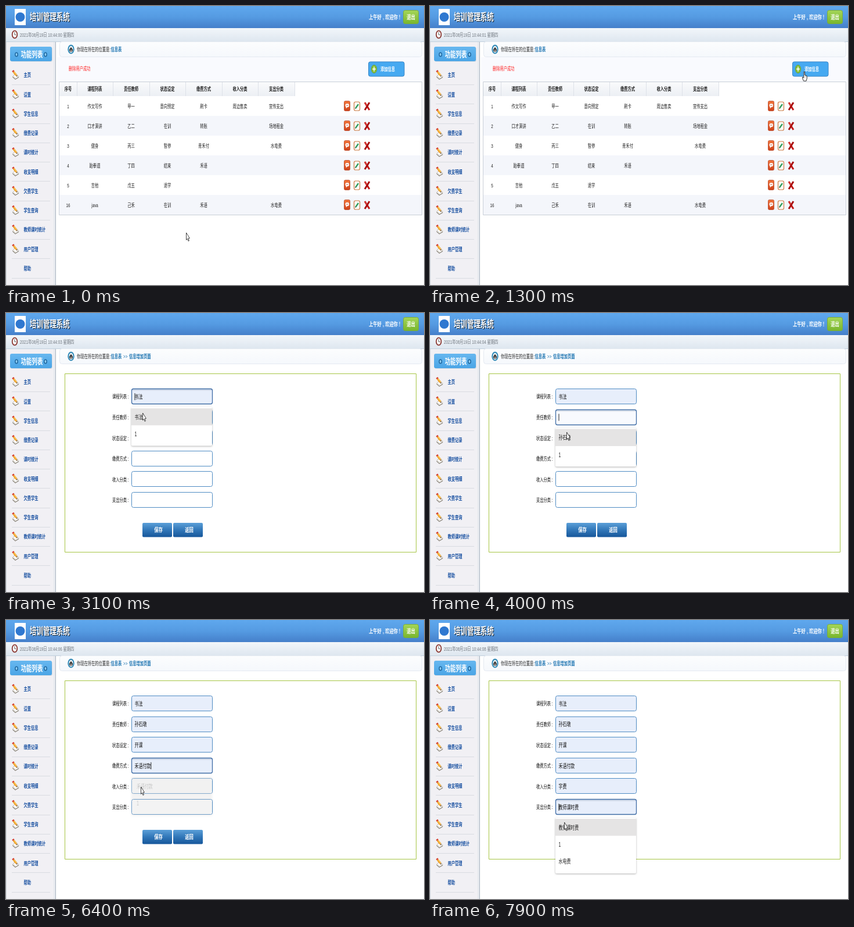
An HTML page with a canvas for the animation above (8000 ms loop, 720 px wide and 480 px high).

```html
<!DOCTYPE html>
<html lang="zh-CN">
<head>
<meta charset="utf-8">
<style>
html, body { margin: 0; width: 720px; height: 480px; overflow: hidden; background: #fff; }
canvas { display: block; }
</style>
</head>
<body>
<canvas id="stage" width="720" height="480"></canvas>
<script>
const ctx = document.getElementById('stage').getContext('2d');
const LOOP = 8000, STEP = 100;
// The whole screen is squeezed, so type and round icons share one scale.
const SX = .521, SY = .765;
const FONT = '"Liberation Sans", "Noto Sans CJK SC", "Noto Sans CJK", sans-serif';

const menu = ['主页', '设置', '学生信息', '缴费记录', '课时统计', '收支明细', '欠费学生', '学生查询', '教师课时统计', '用户管理', '帮助'];
const edges = [92, 122, 184, 247, 309, 372, 434, 497];
const heads = ['序号', '课程列表', '责任教师', '状态设定', '缴费方式', '收入分类', '支出分类'];
const rows = [
  ['1', '作文写作', '甲一', '意向预定', '刷卡', '周边售卖', '宣传支出'],
  ['2', '口才演讲', '乙二', '在训', '转账', '', '场地租金'],
  ['3', '健身', '丙三', '暂停', '青禾付', '', '水电费'],
  ['4', '跆拳道', '丁四', '结束', '禾语', '', ''],
  ['5', '吉他', '戊五', '退学', '', '', ''],
  ['16', 'java', '己禾', '在训', '禾语', '', '水电费']
];
const fields = [
  { label: '课程列表', options: ['书法', '1'], open: 2600, pick: 3200 },
  { label: '责任教师', options: ['孙石墩', '1'], open: 3600, pick: 4300 },
  { label: '状态设定', options: ['开课', '1'], open: 4600, pick: 5100 },
  { label: '缴费方式', options: ['禾语付款', '1'], open: 5700, pick: 6400 },
  { label: '收入分类', options: ['字费', '1'], open: 6700, pick: 7100 },
  { label: '支出分类', options: ['教师课时费', '1', '水电费'], open: 7400, pick: 8100 }
];
const FORM_AT = 1500;
const ARROW = 0, HAND = 1, BEAM = 2;
// time, x, y, pointer shape
const path = [
  [0, 310, 390, ARROW], [150, 310, 390, ARROW], [800, 662, 193, ARROW],
  [1200, 645, 113, HAND], [2000, 645, 113, HAND], [2050, 645, 113, ARROW],
  [2500, 236, 146, BEAM], [2700, 236, 146, ARROW], [3000, 235, 172, ARROW],
  [3250, 235, 172, BEAM], [3500, 235, 182, BEAM], [3700, 235, 184, ARROW],
  [3950, 235, 205, ARROW], [4300, 235, 205, BEAM], [4550, 231, 218, BEAM],
  [4700, 231, 222, ARROW], [4900, 231, 243, ARROW], [5150, 231, 244, BEAM],
  [5450, 226, 256, BEAM], [5700, 226, 256, ARROW], [6000, 232, 287, ARROW],
  [6500, 232, 287, BEAM], [6750, 232, 293, ARROW], [6950, 232, 318, ARROW],
  [7150, 232, 320, BEAM], [7400, 232, 326, ARROW], [7750, 231, 348, ARROW], [8000, 231, 348, ARROW]
];

function pointer(t) {
  t = Math.max(0, t);
  const i = Math.max(0, path.findIndex(p => p[0] > t) - 1);
  const a = path[i], b = path[i + 1], k = (t - a[0]) / (b[0] - a[0]);
  return { x: a[1] + (b[1] - a[1]) * k, y: a[2] + (b[2] - a[2]) * k, shape: a[3] };
}

function text(s, x, y, color, size = 12, bold = false, align = 'left') {
  ctx.save();
  ctx.translate(x, y + size * .37 * SY);
  ctx.scale(SX, SY);
  ctx.font = (bold ? 'bold ' : '') + size + 'px ' + FONT;
  ctx.textAlign = align;
  ctx.fillStyle = color;
  ctx.fillText(s, 0, 0);
  const width = ctx.measureText(s).width * SX;
  ctx.restore();
  return width;
}

function fade(y, h, ...colors) {
  const g = ctx.createLinearGradient(0, y, 0, y + h);
  colors.forEach((c, i) => g.addColorStop(i / (colors.length - 1), c));
  return g;
}

function paint(fill, stroke, line) {
  if (fill) { ctx.fillStyle = fill; ctx.fill(); }
  if (stroke) { ctx.strokeStyle = stroke; ctx.lineWidth = line; ctx.stroke(); }
}

function box(x, y, w, h, fill, r = 0, stroke, line = 1) {
  ctx.beginPath();
  ctx.roundRect(x, y, w, h, r);
  paint(fill, stroke, line);
}

function round(x, y, r, fill, stroke, line = 1) {
  ctx.beginPath();
  ctx.ellipse(x, y, r * SX / SY, r, 0, 0, 7);
  paint(fill, stroke, line);
}

function lines(points, color, width = 1, fill) {
  ctx.beginPath();
  points.forEach(p => ctx.lineTo(p[0], p[1]));
  if (fill) ctx.closePath();
  paint(fill, color, width);
}

function at(x, y, draw) {
  ctx.save();
  ctx.translate(x, y);
  draw();
  ctx.restore();
}

function menuIcon() {
  lines([[-4.5, 3], [1, -2], [6, 3.5], [0, 8]], '#a9a294', .8, '#fff');
  lines([[-4.5, 4], [0, 8], [6, 4.5]], '#8f8a80', 1.2);
  lines([[-2.5, 3.5], [1, 6]], '#c9c4b8', .8);
  lines([[-3, -5], [2, 1.5]], '#f0a32a', 3.6);
  lines([[-2, -5], [2.6, 1]], '#fbd880', 1);
  lines([[-4.3, -6.8], [-2.9, -5]], '#d43a2c', 3.6);
  lines([[2, 1.5], [3.3, 3.2]], '#6b4a28', 1.6);
}

function header(t) {
  box(0, 0, 720, 38, fade(0, 38, '#5fa8ee', '#559be2', '#457fca'));
  box(15, 5, 19, 28, '#fff');
  box(16.5, 11, 16, 16, '#2f78d0', 8);
  text('培训管理系统', 42, 20, '#123', 22, true);
  text('培训管理系统', 41, 19, '#fff', 22, true);
  text('上午好 , 欢迎你 !', 625, 19, '#fff', 14, true);
  box(684.5, 7.5, 26, 23, fade(7, 24, '#a5d65a', '#78b52c'), 3, '#79ad3a');
  text('退出', 697.5, 19, '#fff', 14, true, 'center');
  box(0, 38, 720, 24, fade(38, 24, '#f2f6fa', '#dde6ef'));
  box(0, 61, 720, 1, '#c3d1de');
  round(15, 49, 6.3, '#fff', '#8c3b35', 1.8);
  lines([[15, 45], [15, 49.5], [17.2, 49.5]], '#444', .9);
  const sec = Math.floor((t + 350) / 1000);
  text(`2021年08月19日 10:44:0${sec} 星期四`, 24, 50, '#70777f');
}

function sidebar() {
  box(0, 62, 85, 418, '#f1f0f4');
  box(0, 62, 1, 418, '#d5dae2');
  box(82, 62, 3, 418, '#e6e9ee');
  box(85, 62, 1, 418, '#a9b4c0');
  box(8, 71, 72, 25, '#d3dae2', 3);
  box(7, 70, 72, 25, fade(70, 25, '#67b7ef', '#4ba5e6'), 3);
  round(18, 83.5, 3.2, '#8fd0f8', '#1f679f', 1.5);
  round(68, 83.5, 3.2, '#8fd0f8', '#1f679f', 1.5);
  text('功能列表', 44.5, 83, '#fff', 18, true, 'center');
  menu.forEach((name, i) => {
    const y = 119 + i * 33.25;
    if (i < 10) at(16, y - 1, menuIcon);
    text(name, 30.5, y, '#174fa0', 12, true);
    box(10, Math.round(y + 16), 66, 1, '#d9dbe1');
  });
}

function breadcrumb(form) {
  box(92.5, 61.5, 624, 26, fade(62, 26, '#fcfdfe', '#f5f8fc'), 4, '#e4e9f1');
  round(112, 74.5, 6.8, '#fff', '#3a8fba', 2.2);
  lines([[109.2, 75], [112, 70.8], [114.8, 75], [114, 78.3], [110, 78.3]], '#333', .4, '#333');
  box(111.4, 75, 1.4, 3, '#e8d0c8');
  text('你现在所在的位置是:', 122, 75, '#222');
  const link = '#1a72b0';
  text('信息表', 180.5, 75, link, 12, true);
  if (form) {
    text('>>', 202, 75, link);
    text('信息增加页面', 212, 75, link, 12, true);
  }
}

function actions(y) {
  box(582.5, y - 8.5, 10, 17, fade(y - 8, 16, '#f2743a', '#cf421a'), 2, '#b8482a', .8);
  box(584.5, y - 4, 6.5, 6, '#fff', 2.5);
  lines([[586, y + 1], [586, y + 4], [588.5, y + 1]], '#fff', .5, '#fff');
  lines([[585.8, y - 1], [589.8, y - 1]], '#d0603c', 1);
  box(599.5, y - 7, 10, 15, '#fdfdf8', 2.5, '#cb7a45', 1.2);
  lines([[602, y + 4], [607, y - 3]], '#2f9e60', 2.4);
  lines([[601.4, y + 5], [602.6, y + 3.2]], '#444', 1);
  lines([[618, y - 6], [626, y + 7]], '#c31818', 3);
  lines([[626, y - 6], [618, y + 7]], '#a80f0f', 3);
  lines([[618.3, y - 5.5], [621.5, y - .5]], '#e85a50', 1);
}

function listPage(t) {
  box(88, 88, 632, 42, '#f9fafe');
  text('删除用户成功', 108, 108, '#f22');
  box(624.5, 96, 61.5, 25, '#46a9f1', 3, '#3b86c6');
  round(634, 108.5, 7, '#86bd3a', '#659a2c', .7);
  lines([[631.3, 108.5], [636.7, 108.5]], '#fff', 1.8);
  lines([[634, 104.5], [634, 112.5]], '#fff', 1.4);
  text('添加信息', 645, 109, '#fff', 12, true);

  const hover = Math.floor((pointer(t - 130).y - 155) / 34);
  box(92, 130, 405, 25, fade(130, 25, '#fafbfc', '#eceff4'));
  heads.forEach((h, i) => {
    text(h, (edges[i] + edges[i + 1]) / 2, 143, '#222', 12, true, 'center');
    box(edges[i + 1], 131, 1, 24, '#dde1e8');
  });
  rows.forEach((row, i) => {
    const top = 155 + i * 34;
    box(92, top, 625, 34, i === hover ? '#e5f5c9' : i % 2 ? '#f4f6fb' : '#fff');
    row.forEach((s, c) => text(s, (edges[c] + edges[c + 1]) / 2, top + 18, '#222', 12, false, 'center'));
    actions(top + 17);
  });
  box(91.5, 130.5, 625, 229, null, 0, '#c8ced6');
}

function popup(f, top, t, mouse) {
  const start = top + 33, h = 29.3, n = f.options.length;
  const closing = t >= f.pick;
  ctx.save();
  if (closing) ctx.globalAlpha = .2;
  ctx.shadowColor = 'rgba(0,0,0,.3)';
  ctx.shadowBlur = 3;
  ctx.shadowOffsetY = 1;
  box(216, start - 2, 139, n * h + 8, '#fff', 2);
  ctx.shadowColor = 'transparent';
  const hover = Math.floor((mouse.y - start) / h);
  f.options.forEach((s, i) => {
    const y = start + i * h;
    if (i === hover) box(216, y, 139, h, '#e5e4e4');
    text(s, closing ? 225 : 221.5, y + 15, '#222', 13.33);
  });
  ctx.restore();
}

function formPage(t, mouse) {
  box(101.5, 104.5, 605, 307, null, 0, '#a6c544');
  const focus = fields.findLastIndex(f => t >= f.open);
  const topOf = i => 131 + i * 35.6;
  fields.forEach((f, i) => {
    const top = topOf(i), y = top + 13, edge = Math.round(top) - .5;
    const preview = t >= f.pick - 200, active = i === focus;
    text(f.label + ' :', 183, y, '#111');
    const fill = preview ? '#e7eefb' : active ? '#f8fafe' : '#fff';
    box(216.5, edge, 139, 26, fill, 3, active ? '#3f6ca5' : '#4e8bc3', active ? 1.3 : 1);
    if (active) box(218, edge + 1, 136, 2, 'rgba(60,80,120,.16)');
    const w = preview ? text(f.options[0], 221.5, y, '#111', 13.33) : 0;
    if (active) box(221.5 + (t >= f.pick ? w : 0), y - 6, 1, 12, '#222');
  });
  [['保存', 235], ['返回', 288]].forEach(([s, x]) => {
    box(x, 361, 51, 24.5, fade(361, 24, '#5b9fd8', '#3278b9', '#17589c'), 2);
    text(s, x + 27.5, 373.5, '#fff', 14, true, 'center');
  });
  fields.forEach((f, i) => {
    if (t >= f.open + 100 && t < f.pick + 100) popup(f, topOf(i), t, mouse);
  });
}

function drawPointer({ x, y, shape }) {
  at(x, y, () => {
    if (shape === ARROW) {
      lines([[.5, 0], [.5, 12.5], [2.5, 10.3], [4, 14.5], [5.4, 13.8], [4, 9.8], [6.4, 9.5]], '#333', .9, '#fff');
    } else if (shape === HAND) {
      lines([[-1, 0], [.5, 0], [.8, 6], [4, 7], [4.4, 11], [3, 16], [-1.5, 16], [-3.5, 11], [-3.2, 9], [-1.2, 11]], '#333', 1, '#fff');
      lines([[2, 7], [2, 9.5]], '#555', .6);
    } else {
      lines([[0, -5.5], [0, 5.5]], '#333', 1);
      lines([[-2, -6], [0, -5.3], [2, -6]], '#333', 1);
      lines([[-2, 6], [0, 5.3], [2, 6]], '#333', 1);
    }
  });
}

function frame(now) {
  const t = Math.floor(now % LOOP / STEP) * STEP;
  const mouse = pointer(t), form = t >= FORM_AT;
  box(0, 0, 720, 480, '#fff');
  header(t);
  sidebar();
  breadcrumb(form);
  if (form) formPage(t, mouse);
  else listPage(t);
  drawPointer(mouse);
  requestAnimationFrame(frame);
}
requestAnimationFrame(frame);
</script>
</body>
</html>
```
